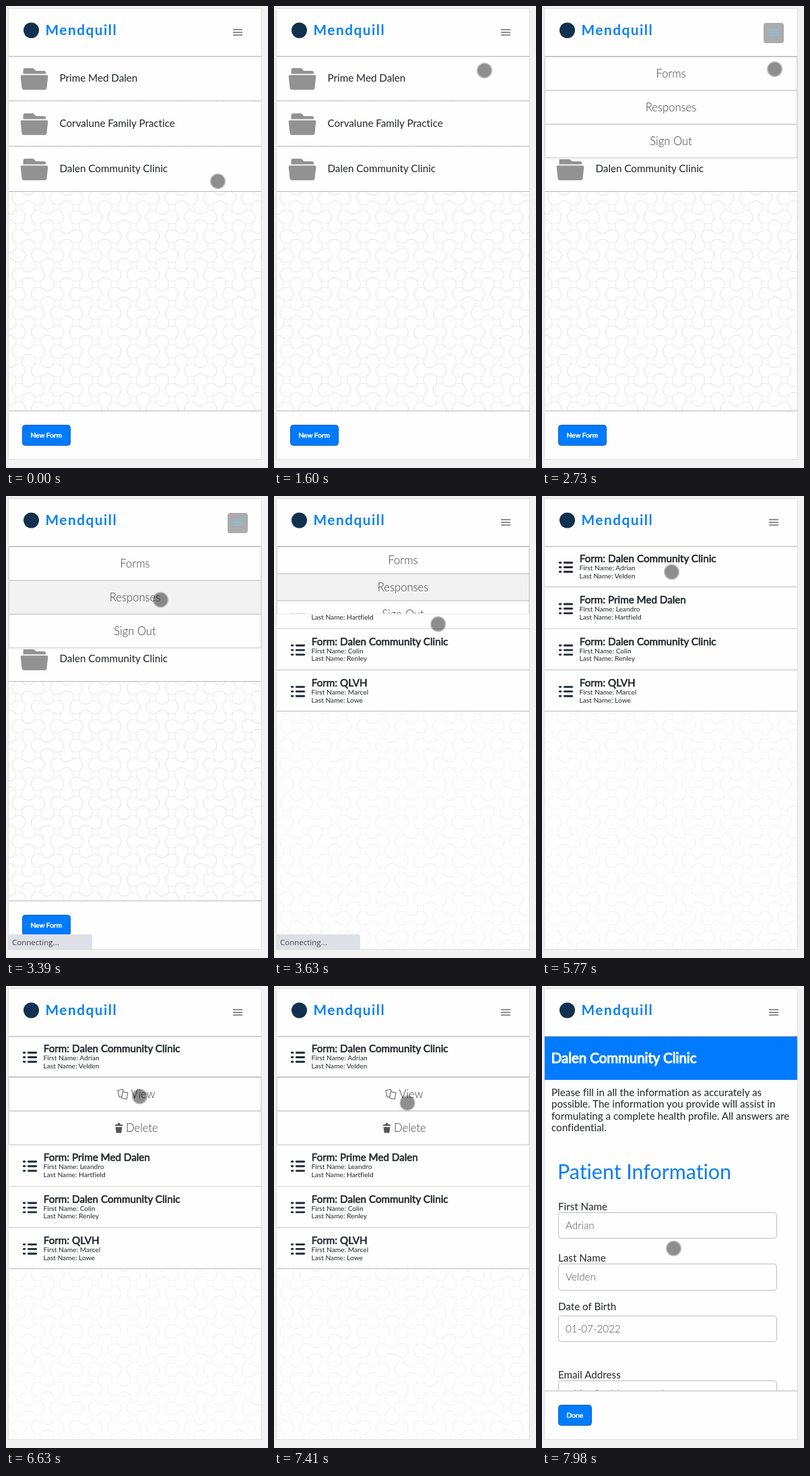
Recreate the animation shown at these times as an HTML page. Size 389 by 684 pixels, loop 8000 ms.

```html
<!DOCTYPE html>
<html lang="en">
<head>
<meta charset="utf-8">
<title>Clinic forms</title>
<style>
  html, body { margin: 0; width: 100%; height: 100%; overflow: hidden; background: #f2f2f2; }
  svg { display: block; }
  text { font-family: Lato, sans-serif; font-size: 15.2px; fill: #212529; white-space: pre; font-variant-ligatures: none; }
  .brand { font-size: 20.8px; font-weight: 700; letter-spacing: 1.5px; fill: #0a80f5; }
  .heavy { stroke: #212529; stroke-width: .04em; }
  .small { font-size: 10.2px; }
  .white { fill: #fff; stroke: #fff; stroke-width: .055em; }
  .item { font-size: 16.6px; font-weight: 300; fill: #3c3c3c; }
  .field { font-weight: 300; fill: #505050; }
  .title { font-size: 20.4px; }
  .section { font-size: 30.4px; fill: #0a7cf5; }
  .status { font: 11.5px "Open Sans", sans-serif; fill: #444; }
</style>
</head>
<body>
<svg id="stage" width="389" height="684" viewBox="0 0 389 684"></svg>
<script>
const DURATION = 8000;
const PANEL = '#fefefe';
const HOME = [314, 259];

// Pointer strokes: a straight line, or a curve bent towards "via"
const MOVES = [
  { start: 540, end: 1600, steps: 8, via: [279, 177], to: [312, 95] },
  { start: 2090, end: 2485, steps: 3, to: [344, 41] },
  { start: 2485, end: 2735, steps: 2, to: [345, 93] },
  { start: 2735, end: 3150, steps: 3, to: [205, 148] },
  { start: 3150, end: 4260, steps: 9, via: [270, 125], to: [236, 414] },
  { start: 4640, end: 5770, steps: 8, via: [270, 263], to: [192, 112] },
  { start: 5905, end: 6630, steps: 5, via: [192, 112], to: [198, 163] },
  { start: 7268, end: 7980, steps: 5, via: [197, 165], to: [195, 388] }
];

const CLINICS = ['Prime Med Dalen', 'Corvalune Family Practice', 'Dalen Community Clinic'];
const RESPONSES = [
  ['Dalen Community Clinic', 'Adrian', 'Velden'],
  ['Prime Med Dalen', 'Leandro', 'Hartfield'],
  ['Dalen Community Clinic', 'Colin', 'Renley'],
  ['QLVH', 'Marcel', 'Lowe']
];
const INTRO = [
  'Please fill in all the information as accurately as',
  'possible. The information you provide will assist in',
  'formulating a complete health profile. All answers are',
  'confidential.'
];
const FIELDS = [
  { label: 'First Name', value: 'Adrian', top: 335.2 },
  { label: 'Last Name', value: 'Velden', top: 411.6 },
  { label: 'Date of Birth', value: '01-07-2022', top: 488.2, gap: 8 },
  { label: 'Email Address', value: 'adrian@velden.example', top: 584.2 }
];

const text = (x, y, s, cls = '', extra = '') => `<text x="${x}" y="${y}" class="${cls}" ${extra}>${s}</text>`;
const rect = (x, y, w, h, fill, extra = '') =>
  `<rect x="${x}" y="${y}" width="${w}" height="${h}" fill="${fill}" ${extra}/>`;
const rule = y => rect(4, y, 375, 1, '#b9b9b9');
const group = (id, body) => `<g id="${id}">${body}</g>`;
const crisp = v => Math.floor(v) + .5;

function patternDefs() {
  const bone = 'M7.1 7.1A10 10 0 1 1-7.1 7.1A10 10 0 0 0-7.1-7.1A10 10 0 1 1 7.1-7.1A10 10 0 0 0 7.1 7.1Z';
  let tile = '';
  for (let i = 0; i < 3; i++)
    for (let j = 0; j < 3; j++)
      tile += `<path d="${bone}" transform="translate(${i * 28.4} ${j * 28.4}) rotate(${(i + j) % 2 * 90})"/>`;
  const make = (id, color, dash) =>
    `<pattern id="${id}" x="232" y="341" width="56.8" height="56.8" patternUnits="userSpaceOnUse">
      <g fill="none" stroke="${color}" stroke-width=".8" stroke-dasharray="${dash}">${tile}</g></pattern>`;
  return `<defs>${make('bones', '#e3e3e3', 'none')}${make('faint', '#e9e9e9', '2 1.5')}</defs>`;
}

const folder = y => `<path transform="translate(22 ${y})" fill="#929292" d="M3.5 8.5V3q0-3 3-3h12l4 4h12q2.5 0 2.5 3v1.5z
  M1.5 10.3h37q2 0 1.8 2l-1.800 17q-.3 2.700-2.500 2.700h-32q-2.200 0-2.500-2.700l-1.800-17q-.2-2 1.800-2z"/>`;

const listIcon = mid => [-6.8, 0, 6.8].map(d =>
  `<path d="M26.3 ${mid + d}h1.500M33.300 ${mid + d}h11.400" stroke="#1f2a3a" stroke-width="2.900" stroke-linecap="round"/>`).join('');

const button = (label, w) =>
  rect(4, 600, 375, 71, PANEL) + rule(599) +
  rect(24.5, 620.5, w, 30, '#007bff', 'rx="4" stroke="#0b5cb5"') +
  text(36.5, 639, label, 'small white');

function homePage() {
  const rows = CLINICS.map((name, i) => {
    const y = 75 + 67 * i;
    return rect(4, y, 375, 66, PANEL) + folder(y + 17) + text(79.5, y + 37, name) + rule(y + 65);
  });
  return rect(4, 75, 375, 596, 'url(#bones)') + rows.join('') + button('New Form', 71);
}

function responseRow([form, first, last], i) {
  const y = 74 + 61.3 * i;
  return rect(4, y, 375, 61.3, PANEL) + listIcon(y + 31.5) +
    text(55.8, y + 24, `Form: ${form}`, 'heavy') +
    text(55.5, y + 36, `First Name: ${first}`, 'small') +
    text(55.5, y + 47.8, `Last Name: ${last}`, 'small') + rule(Math.round(y + 60.4));
}

function listPage() {
  const [head, ...rest] = RESPONSES.map(responseRow);
  return rect(4, 75, 375, 596, 'url(#faint)') + group('rest', rest.join('')) + head + group('actions', '');
}

function formField({ label, value, top, gap = 3.5 }) {
  const y = crisp(top), height = crisp(top + 38.4) - y;
  return text(24, top - gap, label) + rect(24.5, y, 324, height, PANEL, 'rx="4" stroke="#bdbdbd"') +
    text(35, top + 24.6, value, 'field');
}

function formPage() {
  return rect(4, 75, 375, 64, '#007bff') + text(13.8, 114, 'Dalen Community Clinic', 'title white') +
    INTRO.map((line, i) => text(14, 162.5 + 17.5 * i, line)).join('') +
    text(23, 286, 'Patient Information', 'section') +
    FIELDS.map(formField).join('') + button('Done', 49);
}

const viewIcon = y => `<g transform="translate(162 ${y - 7})" fill="${PANEL}" stroke="#555">
  <path d="M0 1.500l7.500-1.500 2 10-7.500 1.500z"/><path d="M7 3.500l8 1.500-1.800 9.500-7.500-1.500z"/></g>`;
const trashIcon = y => `<g transform="translate(157.500 ${y - 7.5})" fill="#555">
  <path d="M1 6.200h10l-1.200 8.800h-7.600z"/><path d="M0 4.500q0-2 2-2h2q0-2.500 2-2.500t2 2.500h2q2 0 2 2z"/></g>`;

const MENU_ITEMS = [{ label: 'Forms' }, { label: 'Responses' }, { label: 'Sign Out' }];
const ACTION_ITEMS = [{ label: 'View', x: 181.5, icon: viewIcon }, { label: 'Delete', x: 174, icon: trashIcon }];

// A drop-down whose items shrink to 40px and are then cut off
function dropdown(items, top, height, hovered) {
  if (height <= 0) return '';
  const h = Math.max(40, height / items.length);
  const body = items.map(({ label, x, icon }, i) => {
    const mid = (i + .5) * h;
    return rect(.5, crisp(i * h), 374, h - 1, i === hovered ? '#f2f2f2' : PANEL, 'stroke="#d6d6d6"') +
      (icon ? icon(mid) : '') +
      text(x ?? 187.5, mid + 6, label, 'item', x ? '' : 'text-anchor="middle"');
  });
  return rect(4, top + height, 375, 2, '#f1f1f1') +
    `<svg x="4" y="${top}" width="375" height="${height}">${body.join('')}</svg>`;
}

const stage = document.getElementById('stage');
stage.innerHTML = patternDefs() +
  rect(0, 0, 389, 684, '#f2f2f2') +
  rect(3.5, 3.5, 376, 668, PANEL, 'stroke="#dedede"') +
  group('home', homePage()) + group('list', listPage()) + group('form', formPage()) +
  rect(4, 75, 375, 2, '#000', 'opacity=".04"') + group('menu', '') +
  rule(74) + '<circle cx="37.5" cy="36" r="11.5" fill="#12304f"/>' + text(58.5, 43, 'Mendquill', 'brand') +
  rect(329, 25, 30, 30, '#acacac', 'id="pressed" rx="4"') +
  '<path id="bars" d="M337 35h14m-14 4h14m-14 4h14" stroke-width="1.6"/>' +
  group('status', '<path d="M4 649H124q4 0 4 4V671H4z" fill="#dee0e7"/>' + text(9, 665, 'Connecting...', 'status')) +
  group('pointer', `<g transform="translate(.5 .5)"><circle r="10" opacity=".44"/>
    <circle r="10.7" fill="none" stroke="#000" stroke-opacity=".25" stroke-width="1.8"/></g>`);

const el = Object.fromEntries([...stage.querySelectorAll('[id]')].map(node => [node.id, node]));
const show = (node, on) => node.setAttribute('display', on ? 'inline' : 'none');
const ramp = (t, start, end) => Math.min(1, Math.max(0, (t - start) / (end - start)));

// The picture only changes on the steps of the current stroke
function snap(t) {
  const move = MOVES.findLast(m => m.start <= t);
  if (!move) return 0;
  const step = (move.end - move.start) / move.steps;
  return Math.min(move.end, move.start + step * Math.floor((t - move.start) / step + .1));
}

function pointerAt(t) {
  let from = HOME;
  for (const { start, end, via, to } of MOVES) {
    const u = ramp(t, start, end);
    from = from.map((a, i) => {
      const bend = via ? via[i] : (a + to[i]) / 2;
      return (1 - u) ** 2 * a + 2 * u * (1 - u) * bend + u * u * to[i];
    });
    if (u < 1) break;
  }
  return from;
}

function render(time) {
  const t = snap(time % DURATION);
  const page = t < 3500 ? 'home' : t < 7540 ? 'list' : 'form';
  for (const name of ['home', 'list', 'form']) show(el[name], name === page);

  const pressed = t >= 2340 && t < 3500;
  show(el.pressed, pressed);
  el.bars.setAttribute('stroke', pressed ? '#7cc4ea' : '#6f6f6f');
  show(el.status, t >= 3390 && t < 4000);

  const menuHeight = 150 * (ramp(t, 2400, 2600) - ramp(t, 3515, 3890));
  const opened = Math.round(100 * ramp(t, 6050, 6480));
  el.menu.innerHTML = dropdown(MENU_ITEMS, 75, menuHeight, t >= 2990 ? 1 : -1);
  el.actions.innerHTML = dropdown(ACTION_ITEMS, 135, opened, -1);
  el.rest.setAttribute('transform', `translate(0 ${opened})`);
  el.pointer.setAttribute('transform', `translate(${pointerAt(t)})`);
}

function loop(now) {
  render(now);
  requestAnimationFrame(loop);
}
render(0);
requestAnimationFrame(loop);
</script>
</body>
</html>
```
